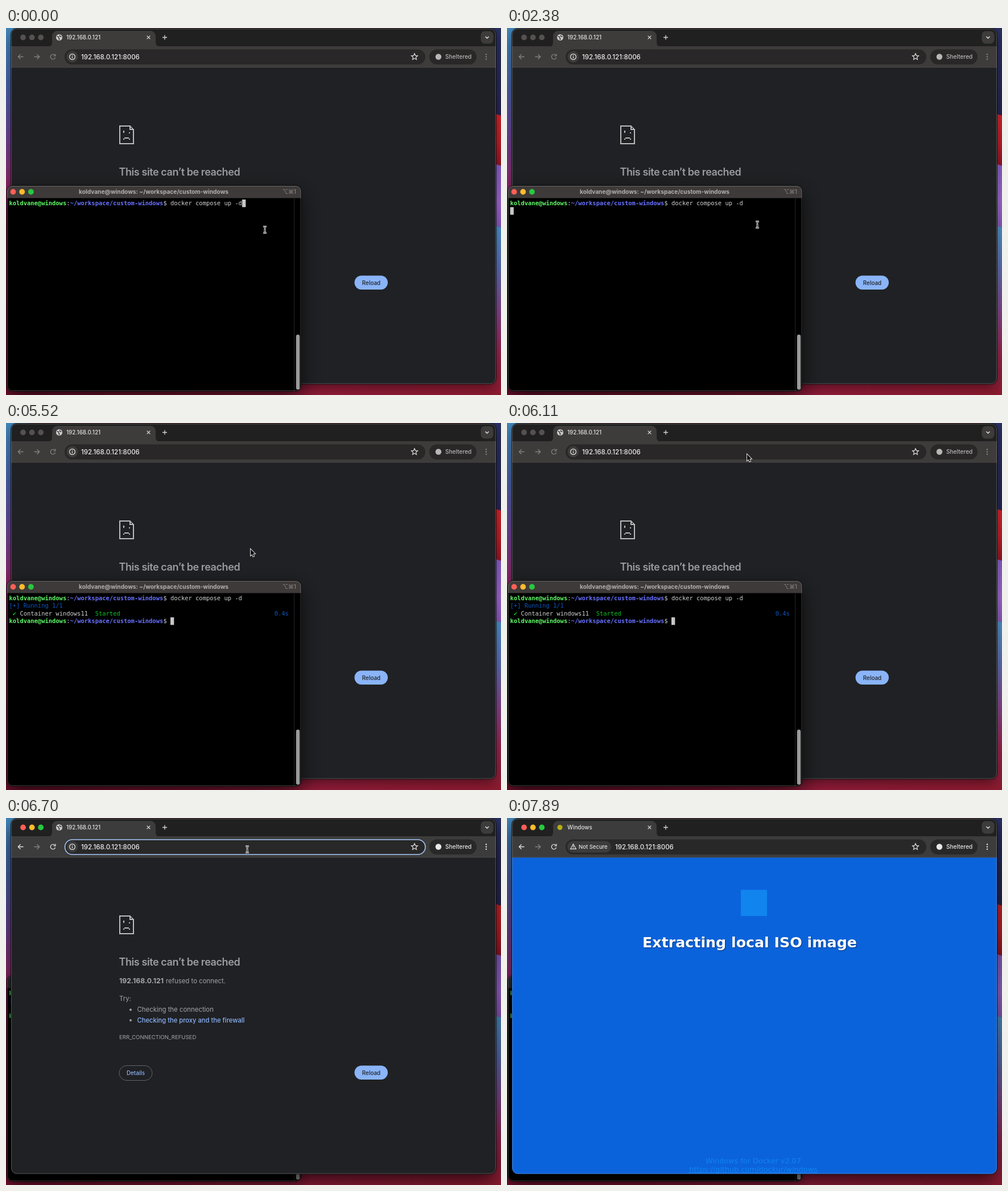
Write an HTML page with a canvas that moves like this. It is 870x644 px and loops after 8000 ms.

```html
<!DOCTYPE html>
<html lang="en">
<head>
<meta charset="utf-8">
<title>Container start</title>
<style>
html, body { margin: 0; width: 100%; height: 100%; overflow: hidden; background: #000; }
canvas { display: block; }
</style>
</head>
<body>
<canvas id="stage" width="870" height="644"></canvas>
<script>
const ctx = document.getElementById('stage').getContext('2d');
const LOOP = 8000;
const UI = 'Inter, sans-serif';
const MONO = '"DejaVu Sans Mono", monospace';
const WIDE = '"DejaVu Sans", sans-serif';
const USER = 'koldvane@windows';
const PATH = '~/workspace/custom-windows';
const IP = '192.168.0.121';
const PORT = ':8006';

// Times at which the scene changes
const T = { enter: 2380, start: 2680, tick: 2830, done: 2970, raise: 6260, active: 6410, load: 7590, chip: 7740, page: 7890 };

// Pointer steps: time, shape, x, y
const POINTER = [
  [0, 'beam', 455, 354], [140, 'beam', 455, 344], [290, 'beam', 446, 341], [440, 'beam', 440, 345],
  [5520, 'arrow', 430, 221.5], [5670, 'arrow', 423, 155.5], [5820, 'arrow', 422, 81.5],
  [5960, 'arrow', 422, 64], [6110, 'arrow', 422, 55],
  [6260, 'beam', 423, 57], [6700, 'beam', 424, 55], [7450, 'none', 0, 0]
];

function text(str, x, y, font, color, align = 'left') {
  ctx.font = font;
  ctx.fillStyle = color;
  ctx.textAlign = align;
  ctx.fillText(str, x, y);
}
function rect(x, y, w, h, color) {
  ctx.fillStyle = color;
  ctx.fillRect(x, y, w, h);
}
function round(x, y, w, h, r, fill, stroke, lw = 1) {
  ctx.beginPath();
  ctx.roundRect(x, y, w, h, r);
  if (fill) { ctx.fillStyle = fill; ctx.fill(); }
  if (stroke) { ctx.strokeStyle = stroke; ctx.lineWidth = lw; ctx.stroke(); }
}
function dot(x, y, r, color) {
  ctx.beginPath();
  ctx.arc(x, y, r, 0, Math.PI * 2);
  ctx.fillStyle = color;
  ctx.fill();
}
function line(points, color, lw = 1.3, close = false) {
  ctx.beginPath();
  points.forEach(([x, y]) => ctx.lineTo(x, y));
  if (close) ctx.closePath();
  ctx.strokeStyle = color;
  ctx.lineWidth = lw;
  ctx.stroke();
}
function fade(x, y, w, h, stops, horizontal) {
  const g = horizontal ? ctx.createLinearGradient(x, 0, x + w, 0) : ctx.createLinearGradient(0, y, 0, y + h);
  stops.forEach(([p, c]) => g.addColorStop(p, c));
  rect(x, y, w, h, g);
}
function shadow(x, y, w, h, r, alpha, blur, dy) {
  ctx.save();
  ctx.shadowColor = `rgba(0,0,0,${alpha})`;
  ctx.shadowBlur = blur;
  ctx.shadowOffsetY = dy;
  round(x, y, w, h, r, '#000');
  ctx.restore();
  round(x - .5, y - .5, w + 1, h + 1, r + .5, null, 'rgba(0,0,0,.75)');
}
function lights(x, y, gap, r, on, off) {
  const colors = on ? ['#ff5f57', '#febc2e', '#28c840'] : [off, off, off];
  colors.forEach((c, i) => dot(x + i * gap, y, r, c));
}

function wallpaper() {
  rect(0, 0, 870, 644, '#7c1530');
  fade(0, 0, 40, 644, [[0, '#4289bd'], [.16, '#4862a8'], [.3, '#6d4396'], [.43, '#94296c'], [.6, '#841a44'], [1, '#76102c']]);
  fade(0, 618, 870, 26, [[0, '#74102e'], [.6, '#911b39'], [1, '#8d1a30']], true);
  // Bands on the right lean slightly
  ctx.save();
  ctx.transform(1, .3, 0, 1, 0, -.3 * 861);
  fade(840, -10, 30, 161, [[0, '#2a3263'], [1, '#272552']]);
  fade(840, 151, 30, 88, [[0, '#d6252c'], [.55, '#c01f2a'], [1, '#981627']]);
  fade(840, 239, 30, 108, [[0, '#8a62cc'], [.6, '#a06bd2'], [1, '#8c5cc0']]);
  fade(840, 347, 30, 297, [[0, '#4f94cc'], [.25, '#5f6fb4'], [.5, '#85478d'], [.75, '#98264f'], [1, '#8b1a2e']]);
  ctx.restore();
}

function sadFile(x, y) {
  const c = '#bcbcbd';
  const bits = [
    [0, 0, 20, 2], [0, 0, 2, 33], [0, 31, 26, 2], [24, 6, 2, 27],
    [18, 2, 2, 6], [18, 6, 8, 2], [20, 2, 2, 2], [22, 4, 2, 2],
    [7, 9, 2, 4], [17, 12, 2, 2],
    [9, 21, 8, 2], [7, 23, 2, 2], [17, 23, 2, 2]
  ];
  bits.forEach(([dx, dy, w, h]) => rect(x + dx, y + dy, w, h, c));
}

function globe(x, y, r, color) {
  dot(x, y, r, color);
  ctx.save();
  ctx.translate(x, y);
  ctx.scale(r / 5.5, r / 5.5);
  line([[-4, -2], [-1, -1], [-1, 1.5], [1, 2.5]], '#3c3c3c', 1.4);
  line([[1, -4.2], [1, -2], [4, -1]], '#3c3c3c', 1.4);
  line([[-1.5, 4], [1.5, 3.6]], '#3c3c3c', 1);
  ctx.restore();
}

function arrowIcon(x, y, dir, color) {
  line([[x - 4.5, y], [x + 4.5, y]], color);
  line([[x + dir * .5, y - 4.2], [x + dir * 4.7, y], [x + dir * .5, y + 4.2]], color);
}
function crossIcon(x, y, r, color, lw) {
  line([[x - r, y - r], [x + r, y + r]], color, lw);
  line([[x - r, y + r], [x + r, y - r]], color, lw);
}
function reloadIcon(x, y, color) {
  ctx.beginPath();
  ctx.arc(x, y, 4.2, .3, Math.PI * 1.75);
  ctx.strokeStyle = color;
  ctx.lineWidth = 1.3;
  ctx.stroke();
  line([[x + 4.4, y - 5], [x + 4.4, y - 1.6], [x + 1, y - 1.6]], color);
}
function star(x, y, color) {
  const pts = [];
  for (let i = 0; i < 10; i++) {
    const a = i * Math.PI / 5 - Math.PI / 2, r = i % 2 ? 2.7 : 5.8;
    pts.push([x + r * Math.cos(a), y + r * Math.sin(a)]);
  }
  line(pts, color, 1.2, true);
}

function tabStrip(t, front, bar) {
  rect(9, 1, 852, 32, '#202020');
  lights(30, 16.5, 15.6, 4.9, front, '#565151');
  ctx.beginPath();
  ctx.moveTo(73, 33);
  ctx.quadraticCurveTo(81, 33, 81, 25);
  ctx.arcTo(81, 5, 90, 5, 9);
  ctx.arcTo(263, 5, 263, 14, 9);
  ctx.lineTo(263, 25);
  ctx.quadraticCurveTo(263, 33, 271, 33);
  ctx.fillStyle = bar;
  ctx.fill();
  let title = IP;
  if (t >= T.page) {
    title = 'Windows';
    dot(93, 16.5, 4.5, '#b5ae12');
  } else if (t >= T.load) {
    title += PORT;
    globe(93, 15.5, 3.6, '#a5a5a5');
  } else {
    globe(93.5, 16.5, 5.5, '#cfcfcf');
  }
  text(title, 106, 20, '500 9.9px ' + UI, '#e2e2e2');
  crossIcon(250.5, 16.5, 2.9, '#e0e0e0', 1.2);
  line([[275, 16.5], [283, 16.5]], '#d5d5d5', 1.3);
  line([[279, 12.5], [279, 20.5]], '#d5d5d5', 1.3);
  round(834.5, 5.5, 22, 22, 7, bar);
  line([[842.5, 15], [845.5, 18], [848.5, 15]], '#e6e6e6', 1.4);
}

function toolbar(t, front, bar) {
  const live = t >= T.active;
  const dim = '#858181', lit = '#e3e3e3', field = front ? '#282828' : '#292727';
  const icon = live ? lit : dim;
  rect(9, 32, 852, 37, bar);
  rect(9, 68.5, 852, 1, front ? '#4b4b4b' : '#4c4848');
  arrowIcon(26, 50.5, -1, icon);
  arrowIcon(54, 50.5, 1, dim);
  if (t >= T.load && t < T.page) crossIcon(82.5, 50.5, 3.7, lit, 1.3);
  else reloadIcon(82.5, 50.5, icon);

  round(103, 37.5, 634, 26.5, 13.2, field);
  if (live && t < T.load) round(103.5, 38, 633.5, 26, 13, null, '#a8c7fa', 1.6);
  const end = t >= T.page ? 183 : t >= T.chip ? 159 : t >= T.load ? 131 : 0;
  if (end) {
    round(106, 40.5, end - 106, 20, 10, '#3c3c3c');
    line([[116.5, 45.8], [121.3, 54.3], [111.7, 54.3]], lit, 1.2, true);
    rect(116, 48.6, 1.1, 2.7, lit);
    rect(116, 52, 1.1, 1.1, lit);
    ctx.save();
    ctx.beginPath();
    ctx.rect(106, 40, end - 111, 21);
    ctx.clip();
    text('Not Secure', 126, 54, '500 9.5px ' + UI, lit);
    ctx.restore();
  } else {
    dot(116.5, 50.5, 10, bar);
    ctx.beginPath();
    ctx.arc(116.5, 50.5, 4.9, 0, Math.PI * 2);
    ctx.strokeStyle = lit;
    ctx.lineWidth = 1.2;
    ctx.stroke();
    rect(115.9, 49.8, 1.2, 3.3, lit);
    rect(115.9, 47.6, 1.2, 1.2, lit);
  }
  text(IP + PORT, end ? end + 7 : 132, 54.5, '500 11.5px ' + UI, '#ececec');
  star(718, 50.5, '#dedede');

  const tone = live ? '#e8e8e8' : '#b9b6b6';
  round(744, 37.5, 83, 26.5, 13.2, field);
  dot(760, 50.5, 5.2, tone);
  text('Sheltered', 772, 54.3, '500 10.1px ' + UI, tone);
  [46.2, 50.5, 54.8].forEach(y => dot(844, y, 1.2, icon));
}

function errorPage() {
  const gray = '#a3a5a8', body = '400 11.4px ' + UI;
  rect(9, 69, 852, 556, '#202124');
  sadFile(199, 171);
  ctx.letterSpacing = '-0.42px';
  text('This site can’t be reached', 198.5, 259, '600 18px ' + UI, '#9b9da0');
  ctx.letterSpacing = '0px';
  text(IP, 199, 290.3, '700 12.3px ' + UI, gray);
  text('refused to connect.', 281, 290.3, body, gray);
  text('Try:', 199, 321.3, body, gray);
  dot(219, 336.5, 1.9, gray);
  text('Checking the connection', 230.5, 340.3, body, gray);
  dot(219, 355, 1.9, gray);
  text('Checking the proxy and the firewall', 230.5, 359, '500 11.2px ' + UI, '#8ab4f8');
  text('ERR_CONNECTION_REFUSED', 199, 388, '400 9.6px ' + UI, gray);
  round(199, 434.5, 58, 26, 13, null, '#5f6368');
  text('Details', 228, 451, '500 9.9px ' + UI, '#8ab4f8', 'center');
  round(612.5, 434.5, 58.5, 24.5, 12.2, '#8ab4f8');
  text('Reload', 642, 450.5, '500 9.9px ' + UI, '#202124', 'center');
}

function installPage() {
  const pale = '#1184ee', small = '12.8px ' + WIDE;
  rect(9, 69, 852, 556, '#0b63dc');
  rect(411, 126, 46, 46, pale);
  ctx.save();
  ctx.shadowColor = 'rgba(0,0,0,.45)';
  ctx.shadowBlur = 2;
  ctx.shadowOffsetX = ctx.shadowOffsetY = 1;
  text('Extracting local ISO image', 426.5, 227.3, 'bold 25.3px ' + WIDE, '#fff', 'center');
  ctx.restore();
  text('Windows for Docker v2.07', 433, 605.5, small, pale, 'center');
  text('https://github.com/dockur/windows', 433, 620.5, small, pale, 'center');
  rect(319, 622, 228, 1, pale);
}

function browser(t) {
  const front = t >= T.raise, bar = front ? '#3c3c3c' : '#3e3b3b';
  shadow(9, 1, 852, 623.5, 10, front ? .7 : .45, front ? 34 : 22, front ? 12 : 6);
  ctx.save();
  ctx.beginPath();
  ctx.roundRect(9, 1, 852, 623.5, 10);
  ctx.clip();
  if (t >= T.page) installPage(); else errorPage();
  tabStrip(t, front, bar);
  toolbar(t, front, bar);
  ctx.restore();
  round(9.5, 1.5, 851, 622.5, 9.5, null, 'rgba(255,255,255,.24)');
}

const CELL = 6.3, ROW = 13.35;
function put(col, row, str, color, bold) {
  text(str, 5.5 + col * CELL, 311 + row * ROW, (bold ? 'bold ' : '') + '10.46px ' + MONO, color);
}
function prompt(row) {
  put(0, row, USER, '#5ff967', true);
  put(16, row, ':', '#c7c7c7');
  put(17, row, PATH, '#6871ff', true);
  put(43, row, '$', '#c7c7c7');
}

function shell(t) {
  const white = '#d2d2d2', blue = '#0a58c0', green = '#0cc420';
  prompt(0);
  put(45, 0, 'docker compose up -d', white);
  let cursor = [65, 0];
  if (t >= T.enter) cursor = [0, 1];
  if (t >= T.start) {
    const done = t >= T.done, tick = t >= T.tick;
    put(0, 1, `[+] Running ${done ? 1 : 0}/1`, done ? blue : white);
    put(1, 2, done ? '✔' : tick ? '⠹' : '⠙', done ? green : '#c7c400');
    put(3, 2, 'Container windows11', white);
    put(24, 2, done ? 'Started' : 'Starting', done ? green : white);
    put(74, 2, done ? '0.4s' : tick ? '0.2s' : '0.1s', blue);
    cursor = [0, 3];
    if (done) {
      prompt(3);
      cursor = [45, 3];
    }
  }
  rect(5.5 + cursor[0] * CELL, 301 + cursor[1] * ROW, 6.3, 13.3, '#c7c7c7');
}

function terminal(t) {
  const front = t < T.raise;
  shadow(2, 277, 516.5, 360, 9, front ? .65 : .4, front ? 36 : 20, front ? 12 : 5);
  ctx.save();
  ctx.beginPath();
  ctx.roundRect(2, 277, 516.5, 360, 9);
  ctx.clip();
  rect(2, 277, 517, 360, '#000');
  rect(2, 277, 517, 21.5, front ? '#3e3a39' : '#2c2b2b');
  lights(12.5, 287.5, 15.7, 4.9, front, '#343232');
  text(`${USER}: ${PATH}`, 259.5, 291, '700 10.2px ' + UI, '#b3afae', 'center');
  text('⌥⌘1', 510, 291, '500 10px ' + UI, '#85807f', 'right');
  rect(506, 298.5, 1, 339, '#252525');
  round(509.8, 538, 6.4, 96.5, 3.2, '#9a9a9a');
  shell(t);
  ctx.restore();
  round(2.5, 277.5, 515.5, 359, 8.5, null, 'rgba(255,255,255,.25)');
}

function beam(x, y) {
  const strokes = [['#f2f2f2', 2.7], ['#1a1a1a', .9]];
  strokes.forEach(([color, lw]) => {
    line([[x - 3, y - 6], [x - 1.2, y - 5.6], [x, y - 4.2], [x + 1.2, y - 5.6], [x + 3, y - 6]], color, lw);
    line([[x - 3, y + 6], [x - 1.2, y + 5.6], [x, y + 4.2], [x + 1.2, y + 5.6], [x + 3, y + 6]], color, lw);
    line([[x, y - 4.5], [x, y + 4.5]], color, lw);
    line([[x - 1.5, y + 1.5], [x + 1.5, y + 1.5]], color, lw);
  });
}
function arrow(x, y) {
  const shape = [[0, 0], [0, 11], [2.5, 8.8], [4.2, 12.8], [6, 12], [4.3, 8.1], [7.6, 7.8]];
  line(shape.map(([dx, dy]) => [x + dx, y + dy]), '#f4f4f4', 1.8, true);
  ctx.fillStyle = '#0a0a0a';
  ctx.fill();
}
function pointer(t) {
  const [, shape, x, y] = POINTER.findLast(step => step[0] <= t);
  if (shape === 'beam') beam(x, y);
  if (shape === 'arrow') arrow(x, y);
}

function draw(t) {
  wallpaper();
  const windows = t < T.raise ? [browser, terminal] : [terminal, browser];
  windows.forEach(paint => paint(t));
  pointer(t);
}

const begin = performance.now();
function frame() {
  draw((performance.now() - begin) % LOOP);
  requestAnimationFrame(frame);
}
frame();
</script>
</body>
</html>
```
